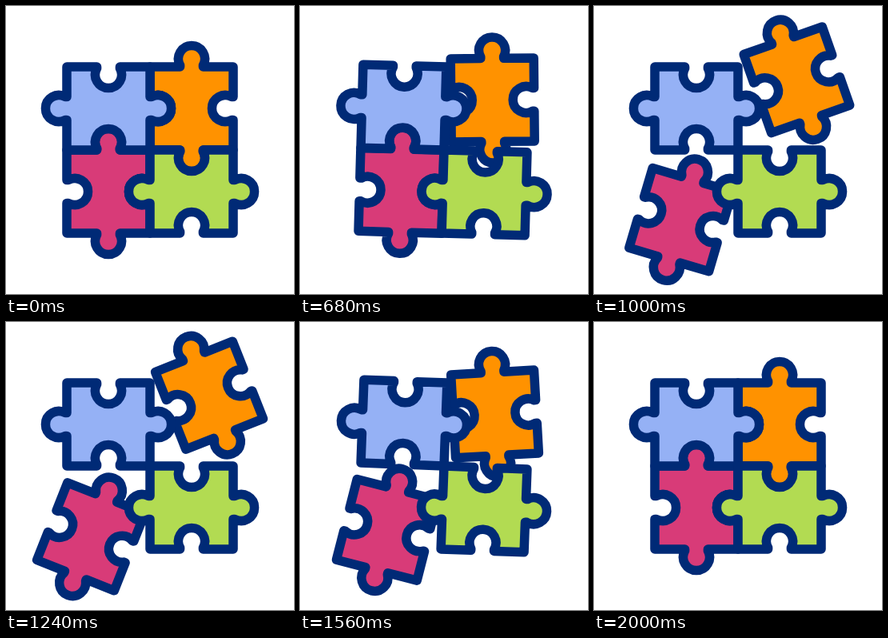
Recreate the animation shown at these times as an HTML page. Size 360 by 360 pixels, loop 2.04 s.

```html
<!DOCTYPE html>
<html lang="en">
<head>
<meta charset="utf-8">
<title>Puzzle</title>
<style>
  html, body { margin: 0; width: 100%; height: 100%; overflow: hidden; background: #fff; }
  svg { display: block; width: 100%; height: 100%; }
</style>
</head>
<body>
<svg viewBox="0 0 360 360">
  <defs>
    <path id="piece" d="M-52-52H-14.4v2A16.5 16.5 0 1 0 14.4-50v-2H52V-14.4h2A16.5 16.5 0 1 1 54 14.4h-2V52H14.4v-2A16.5 16.5 0 1 0-14.4 50v2H-52V14.4h-2A16.5 16.5 0 1 1-54-14.4h2Z"/>
  </defs>
  <g id="group" stroke="#002a76" stroke-width="11.5" stroke-linejoin="round">
    <g id="orange"><use href="#piece" transform="rotate(90)" fill="#ff9200"/></g>
    <g id="pink"><use href="#piece" transform="rotate(90)" fill="#d83b78"/></g>
    <use href="#piece" x="128" y="128" fill="#95b1f5"/>
    <use href="#piece" x="232" y="232" fill="#b2db52"/>
  </g>
</svg>
<script>
const LOOP = 2040, STEP = 40, TURN = 21.6;
const [group, orange, pink] = ['group', 'orange', 'pink'].map(id => document.getElementById(id));

const ease = (t, a, b) => {
  const u = Math.min(1, Math.max(0, (t - a) / (b - a)));
  return u * u * (3 - 2 * u);
};
// rises over a..b, falls back over c..d
const outAndBack = (t, a, b, c, d) => ease(t, a, b) - ease(t, c, d);
const bump = (t, a, b) => t > a && t < b ? Math.sin(Math.PI * (t - a) / (b - a)) ** 2 : 0;

// slides a piece by (dx, dy) and turns it about a point above its centre
function place(el, x, y, dx, dy, shift, angle, pivot) {
  el.setAttribute('transform',
    `translate(${x + dx * shift} ${y + dy * shift}) rotate(${angle} 0 ${-pivot})`);
}

function draw(t) {
  const tilt = 1.6 * bump(t, 400, 1000) + 2.4 * bump(t, 1340, 1900);
  group.setAttribute('transform', `rotate(${tilt} 180 180)`);
  place(orange, 232, 128, 19.8, -35.9, outAndBack(t, 445, 1045, 1377, 1711),
    -TURN * outAndBack(t, 577, 1105, 1297, 1687), 6);
  place(pink, 128, 232, -14.6, 37.7, outAndBack(t, 660, 1050, 1400, 1990),
    TURN * outAndBack(t, 700, 1140, 1330, 1835), 20);
}

const start = performance.now();
function tick() {
  const t = (performance.now() - start) % LOOP;
  draw(Math.floor(t / STEP) * STEP);
  requestAnimationFrame(tick);
}
tick();
</script>
</body>
</html>
```
